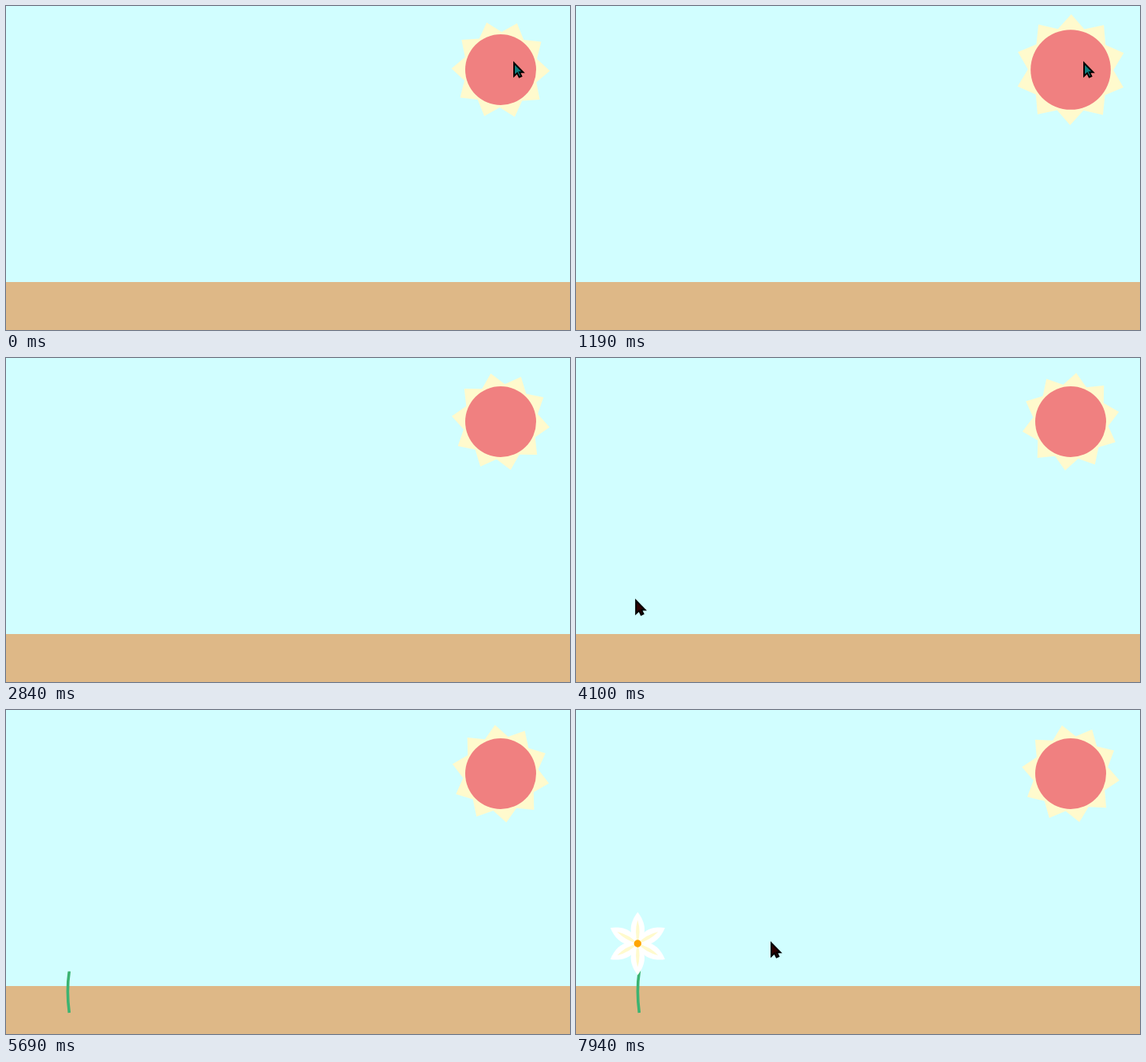
Animation of 716x412 px, one loop 8 s. Source, as an HTML page with a canvas:

```html
<!DOCTYPE html>
<html lang="en">
<head>
<meta charset="utf-8">
<title>Sun and flower</title>
<style>
  html, body { margin: 0; width: 100%; height: 100%; overflow: hidden; }
  canvas { display: block; }
</style>
</head>
<body>
<canvas id="stage" width="716" height="412"></canvas>
<script>
const ctx = document.getElementById('stage').getContext('2d');
const LOOP = 8000;
const TAU = Math.PI * 2;
const CREAM = '#fffacd';

const petal = new Path2D('M0 0C13.5 -12 9.5 -28 0 -40C-9.5 -28 -13.5 -12 0 0');
const streak = new Path2D('M0 0Q4.5 -15 0 -30Q-4.5 -15 0 0');
const stem = new Path2D('M80.3 385Q76.5 357 80.2 333Q81.5 318 78.3 297');
const arrow = new Path2D('M1 1.5V18L5 14.3L7.6 19.5L10.3 18.2L8 13.3H12.5Z');

const progress = (t, start, length) => Math.min(1, Math.max(0, (t - start) / length));
const ease = p => p * p * (3 - 2 * p);

function at(x, y, scale, draw) {
  ctx.save();
  ctx.translate(x, y);
  ctx.scale(scale, scale);
  draw();
  ctx.restore();
}

function disc(radius, color) {
  ctx.fillStyle = color;
  ctx.beginPath();
  ctx.arc(0, 0, radius, 0, TAU);
  ctx.fill();
}

function drawSun(t) {
  const hover = ease(progress(t, 40, 300)) - ease(progress(t, 1320, 300));
  const turn = TAU * (t / 25000 + 0.004);
  at(628, 81, 1 + 0.13 * hover, () => {
    ctx.fillStyle = CREAM;
    ctx.beginPath();
    for (let i = 0; i < 20; i++) {
      const radius = i % 2 ? 48 : 62.5;
      const angle = turn + i * TAU / 20;
      ctx.lineTo(radius * Math.cos(angle), radius * Math.sin(angle));
    }
    ctx.fill();
    disc(45, '#f08080');
  });
}

function drawStem(t) {
  const grown = progress(t, 4490, 2000);
  if (!grown) return;
  ctx.strokeStyle = '#3cb371';
  ctx.lineWidth = 3.6;
  ctx.setLineDash([grown * 88, 200]);
  ctx.stroke(stem);
  ctx.setLineDash([]);
}

function drawFlower(t) {
  const size = ease(progress(t, 6090, 450));
  if (!size) return;
  at(78.3, 297, size, () => {
    for (const [shape, color] of [[petal, '#fff'], [streak, CREAM]]) {
      ctx.fillStyle = color;
      for (let i = 0; i < 6; i++) {
        ctx.fill(shape);
        ctx.rotate(TAU / 6);
      }
    }
    disc(4.7, '#ffa500');
  });
}

// Three visits: leaving the sun, a trip up and back down, a curved arrival.
function pointerPosition(t) {
  if (t < 1720) {
    const p = progress(t, 1250, 470);
    return [644 - 315 * p, 71 + 301 * p];
  }
  if (t > 3750 && t < 5000) {
    const lift = Math.sin(Math.PI * progress(t, 3750, 1250)) ** 2;
    return [65 + 17 * lift, 378 - 119 * lift];
  }
  if (t > 7340) {
    const left = 1 - progress(t, 7340, 590);
    return [247 + 73 * left + 600 * left ** 2 * (1 - left), 295 + 76 * left ** 2];
  }
  return null;
}

function drawPointer(t) {
  const position = pointerPosition(t);
  if (!position) return;
  at(...position, 1, () => {
    // The fill inverts whatever lies below it.
    ctx.globalCompositeOperation = 'difference';
    ctx.fillStyle = '#fff';
    ctx.fill(arrow);
    ctx.globalCompositeOperation = 'source-over';
    ctx.strokeStyle = '#000';
    ctx.lineWidth = 2;
    ctx.stroke(arrow);
  });
}

function frame() {
  const t = performance.now() % LOOP;
  ctx.fillStyle = '#d1feff';
  ctx.fillRect(0, 0, 716, 351);
  ctx.fillStyle = '#deb887';
  ctx.fillRect(0, 351, 716, 61);
  drawSun(t);
  drawStem(t);
  drawFlower(t);
  drawPointer(t);
  requestAnimationFrame(frame);
}
frame();
</script>
</body>
</html>
```
